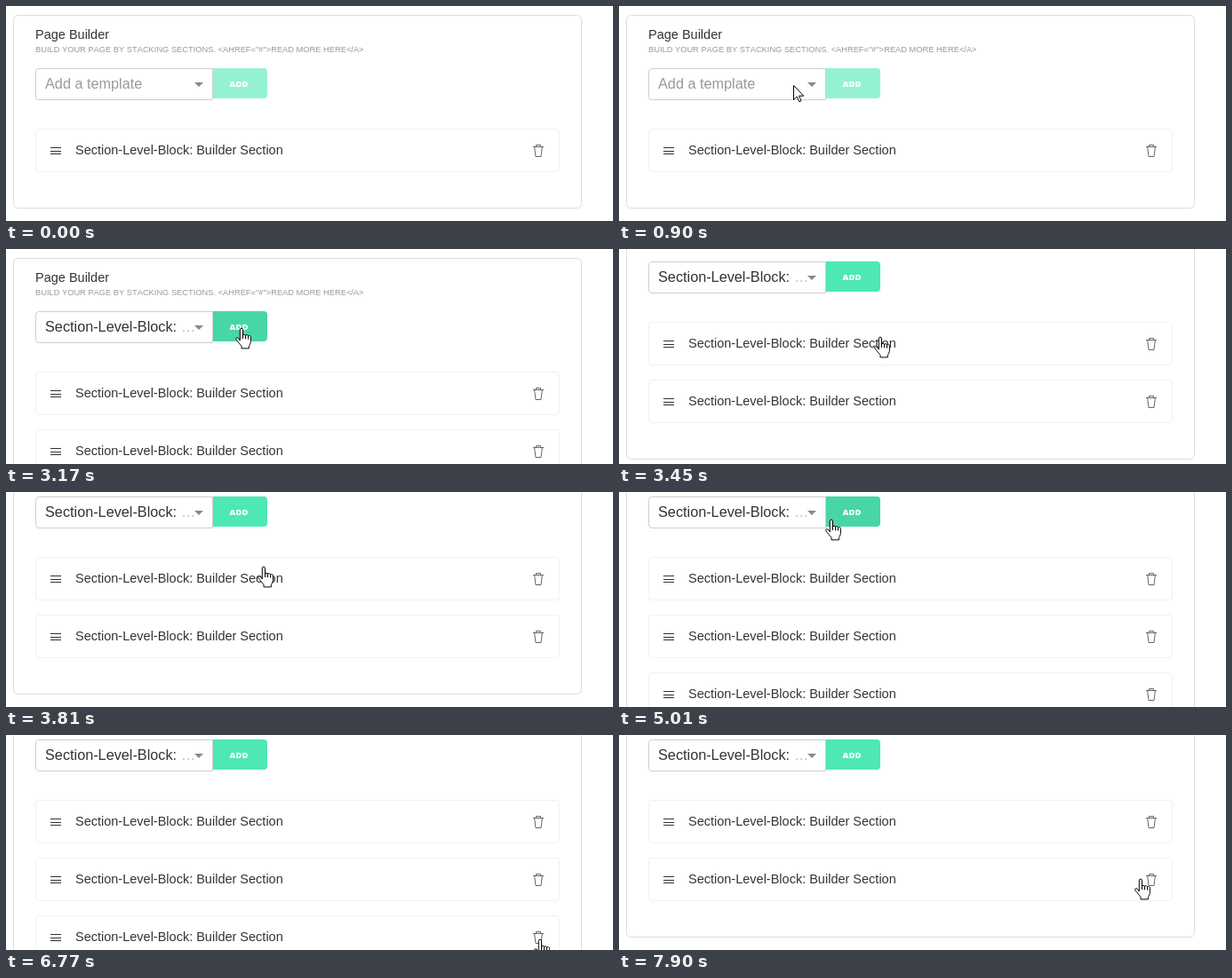
These frames come from a looping animation (683x242 px, 8 s). An HTML page:

```html
<!DOCTYPE html>
<html lang="en">
<head>
<meta charset="utf-8">
<title>Page Builder</title>
<style>
html, body { margin: 0; width: 100%; height: 100%; overflow: hidden; background: #fff; }
svg { display: block; }
text { font-family: "Liberation Sans", Arial, sans-serif; font-kerning: none; white-space: pre; }
.label { font-size: 14.5px; fill: #333; }
.note { font-size: 9.3px; fill: #999; }
.value { font-size: 16.25px; }
.add { font: 800 9.5px "Open Sans", Arial, sans-serif; fill: #fff; }
.line { fill: none; stroke: #666; }
.cursor { fill: #fff; stroke: #000; stroke-linejoin: round; }
</style>
</head>
<body>
<svg width="683" height="242" viewBox="0 0 683 242">
  <defs>
    <filter id="soft" x="-10%" y="-40%" width="120%" height="180%"><feGaussianBlur stdDeviation="1.1"/></filter>
    <g id="row">
      <rect x="33.5" y="138.5" width="589" height="48" rx="3" fill="#fff" stroke="#f1f1f1"/>
      <path d="M50 159.5h12M50 163.5h12M50 166.5h12" stroke="#333"/>
      <text class="label" x="78" y="167">Section-Level-Block: Builder Section</text>
      <path class="line" d="M593 158.5h12M596.5 158v-1.5h5v1.5M594.7 159l1.3 10.5h6l1.3-10.5"/>
    </g>
  </defs>
  <g id="page">
    <rect id="card" x="8.5" y="10.5" width="639" height="217" rx="5" fill="#fff" stroke="#ddd"/>
    <text class="label" x="33" y="37">Page Builder</text>
    <text class="note" x="33" y="52">BUILD YOUR PAGE BY STACKING SECTIONS. &lt;AHREF="#"&gt;READ MORE HERE&lt;/A&gt;</text>
    <rect id="glow" x="32" y="69" width="202" height="38" rx="5" fill="none" stroke="#bfdeff" stroke-width="3" filter="url(#soft)"/>
    <path id="button" d="M233 70h57a4 4 0 0 1 4 4v26a4 4 0 0 1-4 4h-57z"/>
    <text class="add" x="262" y="91" text-anchor="middle">ADD</text>
    <path id="select" d="M232.5 70.5v35H37a3.5 3.5 0 0 1-3.5-3.5V74a3.5 3.5 0 0 1 3.5-3.5z" fill="#fff"/>
    <text class="value" id="value" x="44" y="93"></text>
    <text class="value" id="dots" x="197" y="93" fill="#bbb">…</text>
    <path d="M212 86h10l-5 5z" fill="#888"/>
    <use href="#row"/>
    <use href="#row" class="extra" y="65"/>
    <use href="#row" class="extra" y="130"/>
  </g>
  <g id="cursor">
    <path id="arrow" class="cursor" d="M.5 .5V16.5L4.2 13L6.8 18.8L9 17.8L6.6 12.2H11.8Z"/>
    <g id="hand" class="cursor" transform="translate(-6 -.5)">
      <path d="M5.3 14.5V2.3a1.6 1.6 0 0 1 3.2 0V9a1.5 1.4 0 0 1 3 .3a1.5 1.4 0 0 1 3 .8a1.4 1.3 0 0 1 2.9 1V16c0 2-1.5 3.5-2 5v2.4H7V21C5 18 2 15 .8 13.2c-.8-1.6 1-2.6 2.3-1.6z"/>
      <path fill="none" d="M8.5 8.5v4M11.5 9.3v3.5M14.5 10.1v3"/>
    </g>
  </g>
</svg>
<script>
const LOOP = 8000, TICK = 46, ROW_STEP = 65;
const ENTRY = [621, 262];
const $ = id => document.getElementById(id);
const extras = [...document.querySelectorAll('.extra')];

// pointer moves: start, end, x, y
const moves = [
  [30, 290, 285, 139],
  [490, 950, 193, 87],
  [1460, 1690, 150, 137],
  [1690, 1920, 135, 120],
  [2280, 2790, 256, 86],
  [3170, 3580, 296, 100],
  [3730, 4500, 262, 23],
  [5010, 5200, 195, 46],
  [5200, 5690, 566, 208],
  [5710, 5800, 605, 212],
  [5950, 6260, 600, 230],
  [7570, 7900, 586, 162]
];

// eased share of a move, advancing once per tick
function ease(t, start, end) {
  if (t < start) return 0;
  const ticks = Math.floor((t - start) / TICK) + 1;
  const u = Math.min(1, ticks * TICK / (end - start + TICK));
  return 1 - (1 - u) ** 2;
}

function pointer(t) {
  let [x, y] = ENTRY;
  for (const [start, end, toX, toY] of moves) {
    const e = ease(t, start, end);
    x += (toX - x) * e;
    y += (toY - y) * e;
  }
  return [Math.round(x), Math.round(y)];
}

function draw(t) {
  const rows = t < 2690 ? 1 : t < 4400 ? 2 : t < 7620 ? 3 : 2;
  const chosen = t >= 1644, focused = t >= 950 && t < 2620;
  const scroll = Math.round(ROW_STEP * ease(t, 3260, 3580));
  const [x, y] = pointer(t), pageY = y + scroll;

  const onButton = chosen && x >= 233 && x < 294 && pageY >= 70 && pageY < 104;
  const offset = pageY - 138;
  const onRow = x >= 33 && x < 623 && offset >= 0 && offset < rows * ROW_STEP && offset % ROW_STEP < 49;
  const hand = onButton || onRow;

  $('page').setAttribute('transform', `translate(0 ${-scroll})`);
  $('card').setAttribute('height', 217 + ROW_STEP * (rows - 1));
  extras.forEach((row, i) => row.style.display = i + 1 < rows ? '' : 'none');

  $('glow').style.opacity = focused && t >= 1460 ? 1 : 0;
  $('select').setAttribute('stroke', focused ? '#1a7bea' : '#cfcfcf');
  $('value').textContent = chosen ? 'Section-Level-Block:' : 'Add a template';
  $('value').setAttribute('fill', chosen ? '#333' : '#999');
  $('dots').style.display = chosen ? '' : 'none';
  $('button').setAttribute('fill', !chosen ? '#94f2d3' : onButton ? '#48d6a6' : '#4de8b4');

  $('cursor').style.display = t < 30 ? 'none' : '';
  $('cursor').setAttribute('transform', `translate(${x} ${y})`);
  $('hand').style.display = hand ? '' : 'none';
  $('arrow').style.display = hand ? 'none' : '';
}

function tick() {
  draw(performance.now() % LOOP);
  requestAnimationFrame(tick);
}
tick();
</script>
</body>
</html>
```
